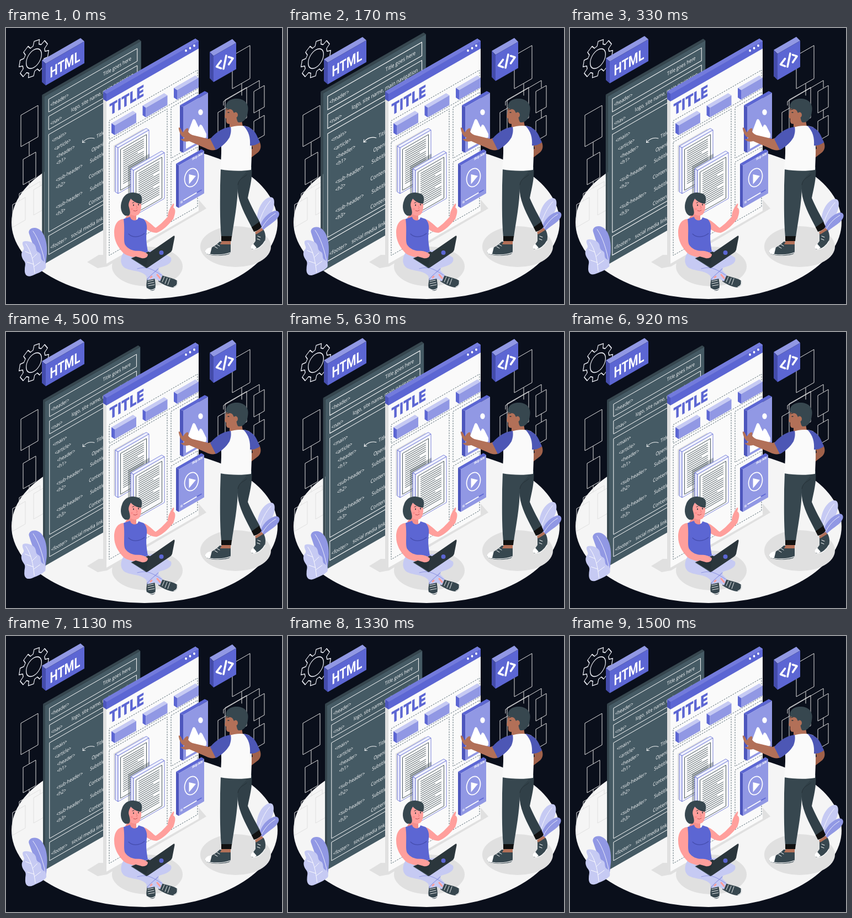
Animation of 500x500 px, one loop 1.54 s. Source, as an HTML page:

```html
<!DOCTYPE html>
<html lang="en">
<head>
<meta charset="utf-8">
<title>Web layout</title>
<style>
html, body { margin: 0; width: 100%; height: 100%; overflow: hidden; background: #0a0f1b; }
svg { display: block; width: 100vw; height: 100vh; }
.hand { font-family: "Open Sans", sans-serif; font-weight: 400; fill: #fff; }
.black { font-family: Inter, sans-serif; font-weight: 900; }
.bold { font-family: Roboto, sans-serif; font-weight: 700; fill: #fff; }
</style>
</head>
<body>
<svg id="stage" viewBox="0 0 500 500"></svg>
<script>
const LOOP = 1540, K = 0.574;
const BLUE = '#5c66d3', MID = '#9198e4', PALE = '#c6caf3', DEEP = '#444cab', SIDE = '#4d56bd';
const DARK = '#37474f', SLATE = '#455a64', INK = '#263238', GREY = '#e0e0e0';
const PINK = '#ff9f9c', BROWN = '#b27058', WHITE = '#fafafa';

// drawing helpers
const path = (d, fill, extra = '') => `<path d="${d}" fill="${fill}" ${extra}/>`;
const poly = (pts, fill, extra = '') => `<polygon points="${pts}" fill="${fill}" ${extra}/>`;
const line = (d, color = '#fff', w = 1, extra = '') =>
  path(d, 'none', `stroke="${color}" stroke-width="${w}" stroke-linecap="round" stroke-linejoin="round" ${extra}`);
const oval = (x, y, rx, ry, fill, extra = '') =>
  `<ellipse cx="${x}" cy="${y}" rx="${rx}" ry="${ry}" fill="${fill}" ${extra}/>`;
const group = (id, body) => `<g id="${id}">${body}</g>`;

// parallelogram lying in the wall plane, (x, y) is its top left corner
const quad = (x, y, w, h) =>
  `${x},${y} ${x + w},${y - K * w} ${x + w},${y - K * w + h} ${x},${y + h}`;
const frame = (x, y, w, h, color = '#fff', sw = 1, extra = '') =>
  poly(quad(x, y, w, h), 'none', `stroke="${color}" stroke-width="${sw}" ${extra}`);
const slab = (x, y, w, h, dx, dy, face, side, top, extra = '') =>
  poly(`${x},${y} ${x + w},${y - K * w} ${x + w - dx},${y - K * w - dy} ${x - dx},${y - dy}`, top, extra) +
  poly(`${x},${y} ${x - dx},${y - dy} ${x - dx},${y + h - dy} ${x},${y + h}`, side, extra) +
  poly(quad(x, y, w, h), face, extra);
const label = (s, x, y, size, cls = 'hand', sx = 0.8, extra = '') =>
  `<text class="${cls}" font-size="${size}" transform="matrix(${sx},${-sx * 0.577},0,1,${x},${y})" ${extra}>${s}</text>`;
const tag = (s, x, y) => label(s.replace('<', '&lt;').replace('>', '&gt;'), x, y, 9.4);

function gear() {
  const pts = [];
  for (let i = 0; i < 8; i++) {
    [[-0.27, 23.5], [-0.18, 31], [0.18, 31], [0.27, 23.5]].forEach(([a, r]) => {
      const q = i * Math.PI / 4 + a + 0.2;
      pts.push((r * Math.cos(q)).toFixed(1) + ',' + (r * Math.sin(q)).toFixed(1));
    });
  }
  return `<g transform="matrix(.866,-.5,0,1,50.5,55.5)" fill="none" stroke="#eceef5" stroke-width="1.5" stroke-linejoin="round">
    <polygon points="${pts.join(' ')}"/><circle r="16"/></g>`;
}

function sitemap() {
  const box = (x, y, w, h) => frame(x, y, w, h, GREY, 1);
  return box(27, 158, 31, 57) + box(31, 238, 23, 46) + box(12, 320, 23, 41) + box(50, 293, 23, 46) +
    line('M42 207V231M42 278V290M24 313V300L62 278V286', GREY) +
    box(410, 50, 32, 60) + box(449, 115, 19, 39) + box(449, 169, 19, 36) +
    box(397, 130, 39, 55) + box(384, 153, 24, 46) +
    line('M427 101V122M394 140V133L459 95V108M459 148V163', GREY);
}

function codePanel() {
  let s = slab(69, 124, 176, 304, 4, 3, SLATE, DARK, DARK);
  [[129, 23], [160, 24], [193, 177], [377, 34]].forEach(([y, h]) => { s += frame(77, y, 161, h); });
  const words = [
    ['<header>', 80, 143], ['Title goes here', 176, 87], ['<nav>', 80, 177],
    ['logo, site name, main navigation', 118, 152],
    ['<main>', 83, 208], ['<article>', 87, 223], ['<header>', 91, 237], ['<h1>', 91, 249],
    ['<sub-header>', 90, 280], ['<h2>', 90, 293], ['<sub-header>', 90, 329], ['<h3>', 90, 342],
    ['<footer>', 80, 402], ['Title', 164, 200], ['Opening', 155, 225], ['Subtitle', 152, 245],
    ['Content', 150, 274], ['Subtitle', 152, 296], ['Content', 150, 322], ['social media links', 118, 381]
  ];
  words.forEach(w => { s += tag(...w); });
  return s + line('M160 200C152 198 145 200 139 207M139 203L138.500 207.500L143 207');
}

function article(x, y) {
  const edge = `stroke="${BLUE}" stroke-width=".8" stroke-linejoin="round"`;
  let s = slab(x, y, 56, 83, 5, 3, WHITE, '#e6e8fb', '#eef0fd', edge) +
    frame(x + 4.5, y + 3, 47, 74, DARK, 0.9, 'stroke-linejoin="round"');
  for (let i = 0; i < 17; i++) {
    const w = i % 6 === 5 ? 26 : 37, y0 = y + 8 + i * 3.7;
    s += line(`M${x + 9.5} ${y0 - 2.5}l${w} ${-K * w}`, DARK, 0.9);
  }
  return s;
}

function page() {
  let s = slab(182, 119, 167, 308, 6, 4, WHITE, GREY, MID) +
    slab(182, 119, 167, 14, 6, 4, BLUE, SIDE, '#737bdd');
  [[326, 41], [333.5, 36.500], [341, 32]].forEach(([x, y]) => { s += oval(x, y, 1.9, 2.2, '#fff'); });
  s += label('TITLE', 187, 159, 28.5, 'black', 0.78, `fill="${BLUE}"`);
  [[187, 168, 160, 34], [187, 207, 105, 205], [299, 144, 48, 92], [299, 243, 48, 108]].forEach(r => {
    s += frame(...r, SLATE, 0.9, 'stroke-dasharray="2.6 2"');
  });
  for (let i = 0; i < 3; i++) s += slab(197 + 56.5 * i, 176.5 - 32 * i, 39, 17.5, 6, 4, MID, BLUE, PALE);
  s += poly(quad(195, 213, 54, 84), GREY) + article(203, 217) +
    poly(quad(221, 250, 39, 76), '#37474f', 'opacity=".35"') + article(231, 258);
  // picture card
  s += slab(321, 143, 45, 83, 6, 3, MID, SIDE, BLUE) +
    path('M326 219L326 199L338 167Q340 163 343 167L349 180L351 176Q353 173 356 178L363 192V198Z', '#fff') +
    oval(352.5, 152.500, 4.2, 5.2, '#fff');
  // video card
  s += slab(313, 249, 46, 77, 5, 3, MID, SIDE, BLUE) +
    label('Skip Ads', 337, 240, 6, 'bold', 0.82) +
    oval(336, 271, 12, 17, 'none', 'stroke="#fff" stroke-width="1.7" transform="rotate(16 336 271)"') +
    path('M331.500 265V283L344 268Z', '#fff') +
    line('M322 312L346 298', '#fff', 1.6) + line('M346 298L354 293.500', BLUE, 1.6) +
    line('M317 314V317.500M319 313V316.500', '#fff', 1);
  return s;
}

function plantLeft() {
  return path('M71 436C59 421 49 394 42 373C38 363 54 357 64 368C72 377 75 393 74 410Z', MID) +
    line('M49 368C59 382 67 405 71 428', '#fff', 0.8) +
    path('M72 434C67 441 58 444 49 448C38 453 33 447 34 437C34 430 37 427 32 421C27 414 27 407 31 403C35 398 29 395 30 389C31 384 43 386 49 390C57 396 52 402 58 406C66 409 61 417 66 421C71 424 73 428 72 434Z', PALE) +
    line('M36 391C46 405 50 424 52 444M45 409L35 405M50 428L38 424M48 417L56 409M51 432L62 424', '#fff', 0.9);
}

function plantRight() {
  return path('M455 352C453 332 463 312 476 307C487 304 487 315 485 324C482 338 470 350 459 365Z', PALE) +
    line('M458 354C463 337 470 323 479 313', '#fff', 0.8) +
    path('M459 368C460 350 472 336 487 331C496 330 497 338 492 344C487 352 474 357 462 370Z', MID) +
    line('M463 363C470 350 478 342 488 336', '#fff', 0.8);
}

function htmlBlock() {
  return slab(72, 64.500, 70, 39.500, 7, 6, BLUE, DEEP, MID) + label('HTML', 79.500, 91, 27, 'bold', 0.745);
}

function tagBlock() {
  return slab(376, 50.500, 41, 47.500, 7, 7, BLUE, DEEP, MID) +
    line('M389.500 59.500L381.500 70L389.500 73M399 50L394 74M403.500 52.500L411 55L403.500 66', '#fff', 3.6);
}

function shoeMan() {
  return path('M387 387L407 388V404C407 410 402 411 391 412C378 413 363 411 361 407C361 400 375 400 387 387Z', DARK) +
    path('M361 404C363 399 368 398 373 397L370 409C366 410 361 408 361 406Z', '#fff') +
    line('M362 408C374 412 394 412 406 407', '#fff', 1.3) +
    line('M378 396L383 399M382 392L387 395', '#fff', 1) +
    path('M452 371L466 365C470 370 471 379 469 386C464 396 455 401 446 401C442 398 448 392 452 386Z', DARK) +
    path('M448 391C444 394 442 397 445 400C449 401 452 400 454 398Z', '#fff') +
    line('M447 401C457 401 465 394 469 386', '#fff', 1.2) +
    line('M455 382L460 384M456 377L461 379', '#fff', 1);
}

function man() {
  return shoeMan() +
    // back leg, front leg, cuffs
    path('M414 254L445 252C447 272 441 292 438 308C445 325 454 340 460 352L446 363C437 345 426 327 421 305Z', '#314048') +
    path('M389 255L440 253C434 266 423 270 420 283C420 318 413 350 409 379H390C387 345 388 310 388 285Z', DARK) +
    line('M436 266C430 272 422 272 420 284', INK, 1) +
    path('M390 377H409L408 386C401 388 396 388 390 386Z', '#111') +
    path('M445 361L459 351L463 360C460 365 454 368 449 369Z', '#111') +
    path('M391 386H407V392H388ZM451 370L463 362L466 366L453 374Z', BROWN) +
    // far arm
    path('M442 204L459 205C463 213 462 220 457 225L444 235L441 224L447 218Z', '#a0614a') +
    // neck and torso
    path('M405 166L426 162L430 184L405 185Z', BROWN) +
    path('M403 181C415 176 433 176 441 180C447 205 445 230 444 257C427 260 405 259 388 256C390 235 391 218 389 204C392 193 396 185 403 181Z', WHITE) +
    path('M430 177C442 178 450 186 454 194L460 207C454 212 448 213 442 213C443 199 440 187 430 177Z', '#4d57b5') +
    // reaching arm
    path('M380 196L385 218C378 223 370 222 362 218L332 205C325 207 319 205 316 201C321 202 324 200 323 198C318 197 315 192 313 183C312 179 315 180 317 183L320 189C322 189 323 184 327 182C331 180 331 184 330 188C332 191 335 193 338 194L367 201Z', BROWN) +
    path('M407 179C393 181 382 187 370 201L380 221C390 216 400 207 405 198C408 190 408 184 407 179Z', '#4d57b5') +
    // head
    path('M400 142C397 150 398 156 396 160C396 163 399 163 399 165C398 173 402 176 410 172L424 168V145Z', BROWN) +
    path('M399 146C396 134 407 127 420 128C433 129 441 138 438 152C437 164 430 172 421 171C417 168 419 160 414 155C411 152 412 148 406 147Z', DARK) +
    oval(416, 157.500, 4, 5, BROWN) + line('M402 153L404 153', INK, 1.4) + line('M400 148L404 147', INK, 1.2);
}

function woman() {
  return (
    // shoes
    path('M255 453L269 451C270 459 272 466 270 473C267 478 258 476 255 471C253 465 256 459 255 453Z', DARK) +
    line('M256 472C260 476 266 475 270 472', '#fff', 1.2) +
    line('M257 459L267 457M257 463L268 461M258 467L269 465', '#fff', 0.9) +
    path('M280 447C288 451 301 452 309 457C314 461 310 469 303 470C293 469 282 463 276 459Z', DARK) +
    line('M287 451L283 460M292 453L288 463M297 454L293 465', '#fff', 0.9) +
    line('M310 459C312 464 308 468 304 469', '#fff', 1.2) +
    // trousers
    path('M215 404C206 415 206 429 216 435C229 441 245 439 254 449L256 457L270 454L279 459L284 447C277 441 273 437 278 434C292 430 302 426 299 416L275 402Z', PALE) +
    line('M238 436C252 432 262 434 282 448M256 456C258 450 268 444 276 436', MID, 1.1) +
    line('M274 447L279 453M262 452L264 450', PINK, 3) +
    // raised arm
    path('M247 346C256 347 263 356 271 362C280 356 286 349 293 342C293 334 297 326 302 319C305 316 305 320 303 325C309 328 306 338 303 346C294 357 284 367 273 371C264 371 256 366 249 361Z', PINK) +
    // body
    path('M222 334L236 336V347L245 350L228 358L214 348Z', '#f58f8c') +
    path('M213 346C219 344 222 343 225 342C226 350 238 351 240 343L249 346C254 350 256 358 255 366C253 382 255 393 257 405C243 411 226 411 213 406C214 392 209 377 210 365Z', BLUE) +
    line('M222 373C229 380 241 380 251 372', DEEP, 1.1) +
    // near arm
    path('M213 346C200 347 196 359 196 371C196 386 203 397 212 407C219 414 236 416 246 419C252 420 257 416 257 411C253 406 246 404 239 404C229 404 221 400 216 393C212 386 216 367 213 346Z', PINK) +
    // head
    path('M221 313C228 307 240 308 244 314C246 323 245 333 240 338C234 342 227 339 222 335Z', PINK) +
    path('M216 340C208 336 206 323 210 313C214 300 226 296 236 299C246 300 248 308 245 318C239 319 230 314 226 309C223 315 221 319 223 325C225 333 226 337 222 340Z', DARK) +
    oval(231, 321, 0.9, 1.4, INK) + oval(240, 320, 0.9, 1.4, INK) +
    line('M229 317L232 316M238 315L241 316', INK, 0.9) + line('M236 322L238 326L236 327', '#e87573', 0.9) +
    line('M231 331Q235 333 238 330', '#c24c4e', 1) +
    oval(228, 328, 2.4, 2, '#ff8486', 'opacity=".6"') +
    // laptop
    path('M227 417L258 405L283 416L254 435Z', INK) + line('M227 417.500L254 434', '#4f626c', 1) +
    path('M261 406L303 377Q306 375 305.500 379L301 402Q300 405 297 407L257 434Q253 436 254 432L258 410Q259 407 261 406Z', '#2b363c') +
    oval(281.500, 407, 4, 4, BLUE) +
    path('M235 404C244 403 253 406 257 410C257 415 252 418 246 417L232 413Z', PINK)
  );
}

const stage = document.getElementById('stage');
stage.innerHTML =
  '<rect width="500" height="500" fill="#0a0f1b"/>' +
  oval(251, 352, 241, 139, '#f5f5f5') +
  sitemap() + gear() +
  poly('147,424 168,411 180,411 349,311 363,327 183,432 166,435', GREY) +
  oval(416, 396, 64, 37, GREY) + oval(256, 432, 64, 36, GREY) +
  group('panel', codePanel()) +
  group('plants', plantLeft() + plantRight()) +
  page() +
  group('blocks', htmlBlock() + tagBlock()) +
  man() + woman();

const [panel, plants, blocks] = ['panel', 'plants', 'blocks'].map(id => document.getElementById(id));

const BEAT = [[0, 0], [150, 0.1], [425, 0], [605, 0], [752, 0.1], [900, 0], [LOOP, 0]];
const FLOAT = [[0, 0], [LOOP / 2, -9], [LOOP, 0]];
const WIND = [[0, 0], [LOOP / 4, 1], [LOOP * 3 / 4, -1], [LOOP, 0]];

function at(keys, t) {
  const i = keys.findIndex(k => k[0] > t);
  const [t0, a] = keys[i - 1], [t1, b] = keys[i];
  return a + (b - a) * (t - t0) / (t1 - t0);
}

function draw(t) {
  const s = 0.979 * (1 + at(BEAT, (t + 28) % LOOP));
  panel.setAttribute('transform', `translate(163 218) scale(${s}) translate(-163 -218)`);
  plants.setAttribute('transform', `rotate(${at(WIND, t)} 261 380)`);
  blocks.setAttribute('transform', `translate(0 ${at(FLOAT, t)})`);
}

let start = null;
function tick(now) {
  if (start === null) start = now;
  draw(Math.max(0, now - start) % LOOP);
  requestAnimationFrame(tick);
}
draw(0);
requestAnimationFrame(tick);
</script>
</body>
</html>
```
